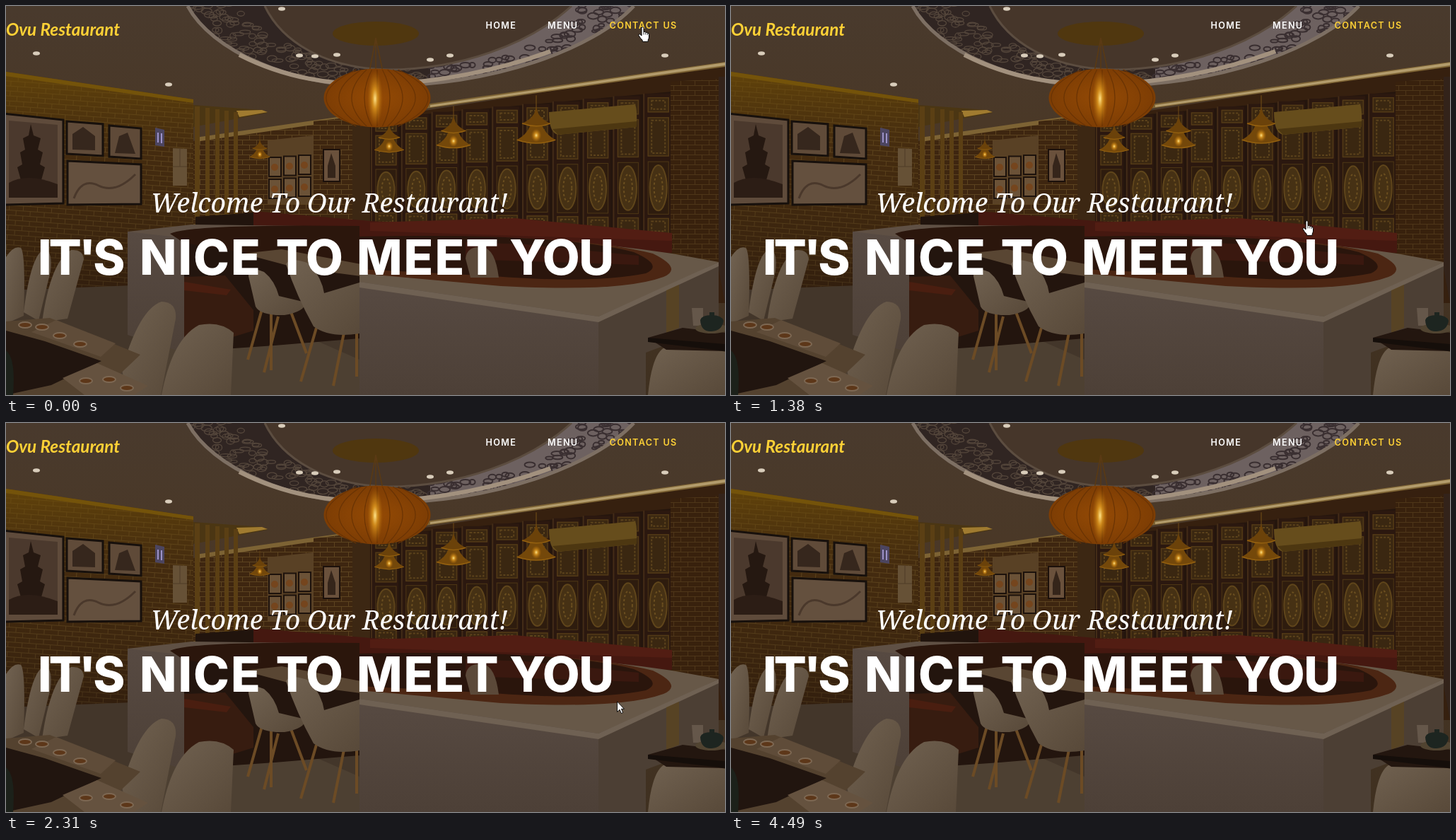
These frames come from a looping animation (1017 px wide and 550 px high, 8 s). An HTML page:

```html
<!DOCTYPE html>
<html lang="en">
<head>
<meta charset="utf-8">
<title>Restaurant</title>
<style>
html, body { margin: 0; width: 100%; height: 100%; overflow: hidden; background: #3b2c20; }
svg { display: block; width: 1017px; height: 550px; }
.brand { font: italic 700 24.3px Lato, sans-serif; fill: #fed136; }
.nav { font: 600 12.6px Inter, sans-serif; letter-spacing: 1.35px; fill: #fff; }
.nav .on { fill: #fed136; }
.lead { font: italic 400 37.5px "Noto Serif", serif; fill: #fff; }
.title { font: 800 68.5px Inter, sans-serif; letter-spacing: -1.5px; fill: #fff; }
.title .tight { letter-spacing: -4px; }
.title .wide { letter-spacing: 2px; }
</style>
</head>
<body>
<svg viewBox="0 0 1017 550" xmlns="http://www.w3.org/2000/svg">
<defs>
  <linearGradient id="ceil" x2="0" y2="1"><stop stop-color="#493a2d"/><stop offset=".3" stop-color="#4a3827"/><stop offset="1" stop-color="#3f3020"/></linearGradient>
  <linearGradient id="wallGlow" x2="0" y2="1"><stop stop-color="#6e4d08" stop-opacity=".75"/><stop offset=".35" stop-color="#5a3e0c" stop-opacity=".2"/><stop offset="1" stop-color="#1c100a" stop-opacity=".4"/></linearGradient>
  <linearGradient id="face" x2="0" y2="1"><stop stop-color="#574a42"/><stop offset="1" stop-color="#4d4037"/></linearGradient>
  <linearGradient id="seat" x2="1" y2="1"><stop stop-color="#716251"/><stop offset="1" stop-color="#584939"/></linearGradient>
  <radialGradient id="lamp"><stop stop-color="#944a05"/><stop offset="1" stop-color="#7d3d04"/></radialGradient>
  <radialGradient id="glow"><stop stop-color="#ffe48a"/><stop offset=".35" stop-color="#e09a20" stop-opacity=".8"/><stop offset="1" stop-color="#b06a0a" stop-opacity="0"/></radialGradient>
  <pattern id="brick" width="20" height="14" patternUnits="userSpaceOnUse">
    <rect width="20" height="14" fill="#3e2610"/>
    <path d="M0 .5H20M0 7.5H20M4.500 0V7M14.500 7V14" stroke="#5c4320"/>
  </pattern>
  <pattern id="brickL" href="#brick" patternTransform="rotate(4)"/>
  <clipPath id="ring"><path d="M257 0C290 62 400 114 530 113C690 112 830 62 888 0H800C740 55 640 90 540 90C450 88 390 50 366 0Z"/></clipPath>
</defs>

<!-- ceiling -->
<rect width="1017" height="550" fill="url(#ceil)"/>
<path d="M257 0C290 62 400 114 530 113C690 112 830 62 888 0Z" fill="#46362a"/>
<g clip-path="url(#ring)">
  <path d="M250 0H600V120H250Z" fill="#302522"/><path d="M600 0H900V120H600Z" fill="#6d6160"/>
  <g id="rings" fill="none"></g>
</g>
<g fill="none">
  <path d="M257 0C290 62 400 114 530 113C690 112 830 62 888 0" stroke="#7d6f63" stroke-width="5"/>
  <path d="M366 0C390 50 450 88 540 90C640 90 740 55 800 0" stroke="#5c4d40" stroke-width="3"/>
  <path d="M330 69C395 102 460 112 530 110C610 109 700 90 770 64" stroke="#a2917e" stroke-width="6"/>
</g>
<ellipse cx="523" cy="39" rx="61" ry="17" fill="#50370f"/>
<g id="spots" fill="#d9cdbb"></g>

<!-- back wall -->
<path d="M265 191L515 160L1017 82V420H265Z" fill="#36200f"/>
<path d="M265 191L515 153V320H265Z" fill="url(#brick)"/>
<path d="M268 186L600 138L1017 79V86L600 144L268 192Z" fill="#7d6334"/>
<path d="M600 140L1017 80V84L600 143Z" fill="#b39c6c"/>
<path d="M265 140L362 147L370 151L265 171Z" fill="#4b3613"/>
<path d="M326 148L362 147L370 150L330 157Z" fill="#a07b30"/>
<path d="M515 160L942 121V332L515 312Z" fill="#24150d"/>
<g id="panels"></g>
<path d="M940 107L1012 103V372L940 350Z" fill="url(#brick)"/>
<path d="M940 107L1012 103V372L940 350Z" fill="#241307" opacity=".25"/>
<path d="M1008 100H1017V420L1008 372Z" fill="#33231a"/>
<path d="M435 163L490 157V310H435Z" fill="url(#brick)"/>
<path d="M490 157L515 165V312H490Z" fill="#3c2713"/>
<path d="M370 190L435 183V280H370Z" fill="#594125"/>
<g id="posters"></g>
<rect x="449" y="203" width="23" height="45" fill="#6a513c" stroke="#1c110b" stroke-width="2"/>
<path d="M460 208L466 226V243H455V226Z" fill="#35251a"/>
<path d="M267 142h7v158h-7zM282 144h6v156h-6zM296 146h6v154h-6zM309 148h6v152h-6zM322 150h6v150h-6z" fill="#5b3f14"/>
<path d="M768 150L889 139Q893 140 892 171L781 182Q768 180 768 150Z" fill="#664d1c"/>
<path d="M773 174L892 163V171L781 182Z" fill="#4d3711"/>

<!-- left wall -->
<path d="M0 93L265 132V330L180 345V400L0 410Z" fill="url(#brickL)"/>
<path d="M0 93L265 132V330L180 345V400L0 410Z" fill="url(#wallGlow)"/>
<path d="M0 93L265 132V137L0 99Z" fill="#74530a"/>
<g stroke="#17100c" stroke-width="3">
  <path d="M-4 152L81 161V279L-4 281Z" fill="#5f4b3b"/>
  <path d="M86 163L137 167V212L86 209Z" fill="#604b39"/>
  <path d="M146 169L191 173V216L146 213Z" fill="#5f4a38"/>
  <path d="M87 219L191 224V280L87 281Z" fill="#64503e"/>
</g>
<path d="M4 162L73 168V270H4Z" fill="#4b392d"/>
<path d="M35 167L39 183L49 187L45 203L52 207L48 224L55 228L50 246H54V270H17V246H21L16 228L23 224L20 207L27 203L24 187L32 183Z" fill="#251811"/>
<path d="M4 250Q30 235 73 252V271H4Z" fill="#2c1d15"/>
<path d="M94 203V181L109 171L126 184V204ZM154 208L160 184L172 179L183 209Z" fill="#36271d"/>
<path d="M96 272Q107 242 131 254T183 238" fill="none" stroke="#4a382b" stroke-width="3"/>
<path d="M211 172L224 175V199L211 197Z" fill="#4c4560"/>
<path d="M215 179v14M220 180v14" stroke="#9d92c8" stroke-width="2"/>
<path d="M236 201L256 202V254H236Z" fill="#665136"/>
<path d="M236 227h20M246 202v25" stroke="#4e3c27"/>

<!-- lamps -->
<g id="lamps"></g>
<path d="M523 45V90M523 45L514 93M523 45L533 93" fill="none" stroke="#5a3a14" stroke-width="1.500"/>
<ellipse cx="525" cy="130" rx="75.500" ry="41.500" fill="url(#lamp)"/>
<g id="ribs" fill="none" stroke="#693304" stroke-width="1.200"></g>
<ellipse cx="522" cy="131" rx="11" ry="40" fill="url(#glow)"/>

<!-- floor and sofas -->
<path d="M0 402L180 395L252 440L500 445V550H0Z" fill="#43362a"/>
<path d="M180 490L340 430L500 500V550H120Z" fill="#4d4032"/>
<path d="M268 298L350 292V312L268 310Z" fill="#21140d"/>
<path d="M350 290L515 304L942 325V349L500 331L350 312Z" fill="#451810"/>
<path d="M515 306L720 300L942 321V332L515 318Z" fill="#521d13"/>
<path d="M172 319L262 309L500 312V340H235Z" fill="#5f5044"/>
<path d="M172 319L252 328V490L172 465Z" fill="url(#face)"/>
<path d="M232 322Q260 308 500 311V380L252 381V335Z" fill="#2b160c"/>
<path d="M252 335L345 350L500 369V470L380 480L252 489Z" fill="#23150e"/>
<path d="M252 383L310 381L350 430V459L252 489Z" fill="#371c10"/>
<path d="M252 390L318 401L312 409L252 402Z" fill="#4a1e10"/>
<path d="M335 350L390 344L502 365V382L410 370Z" fill="#594633"/>

<!-- main counter -->
<path d="M500 333Q700 314 942 350L1008 362L838 443L500 394Z" fill="#675848"/>
<path d="M500 331Q790 318 915 350Q958 371 930 383Q870 405 700 396L500 378Z" fill="#4c2613"/>
<path d="M500 326Q780 320 888 348Q931 367 905 378Q830 393 690 382L500 372Z" fill="#2a150c"/>
<path d="M650 334L735 337L895 353V366L650 358Z" fill="#3a180f"/>
<path d="M650 357q2-18 24-16q18 2 23 43h-40z" fill="#5b4939"/>
<path d="M500 390L838 439V550H500Z" fill="url(#face)"/>
<path d="M838 439L1008 364V452L905 490V550H838Z" fill="#4c3f34"/>
<path d="M500 390L838 439L1008 362V368L838 447L500 398Z" fill="#6f6153"/>
<path d="M934 402L952 394V455L934 462Z" fill="#604719" opacity=".6"/>

<!-- chairs and tables -->
<g fill="none" stroke="#6c4b25" stroke-width="4">
  <path d="M362 429L342 500M375 435V515M402 430L425 491M385 439L365 518"/>
  <path d="M439 455L417 531M478 462L463 537M496 455V524"/>
</g>
<g fill="url(#seat)">
  <path d="M343 382Q342 366 365 376Q380 388 386 410L424 419Q423 432 394 437Q360 438 353 425Z"/>
  <path d="M396 365Q401 354 429 364Q447 385 450 406L500 391V463Q458 470 435 453Q411 410 396 365Z"/>
  <path d="M0 355Q11 338 21 342Q28 350 25 438L0 449Z"/>
  <path d="M25 433Q36 346 56 344Q66 348 63 375L46 445Z"/>
  <path d="M51 447Q63 361 92 345Q109 344 110 358L87 442Z"/>
  <path d="M164 514Q188 429 220 418Q242 419 240 442L219 550H171Z"/>
  <path d="M220 550Q235 471 273 451Q303 445 322 462L318 550Z"/>
  <path d="M908 550Q914 488 934 482Q981 478 1017 489V550Z"/>
</g>
<path d="M0 446L62 441L190 493L130 550H0Z" fill="#54422f"/>
<path d="M0 459L55 474L135 502L64 536L0 550Z" fill="#21150f"/>
<path d="M71 444L155 477L134 496L36 461Z" fill="#5f4c39"/>
<path d="M80 526L129 505L201 537L181 550H111Z" fill="#65523f"/>
<g id="plates" stroke="#7d6853" stroke-width="2" fill="#5d3719"></g>
<path d="M0 487Q14 497 10 550H0Z" fill="#1c211a"/>
<path d="M908 469L957 455L1017 462V488L934 486Z" fill="#23160f"/>
<path d="M908 469L1017 478V488L908 475Z" fill="#150e0a"/>
<path d="M970 427h16v25h-14z" fill="#65574a"/>
<ellipse cx="998" cy="456" rx="23" ry="7" fill="#514431"/>
<path d="M982 444Q984 437 998 437T1015 445Q1013 459 998 460T982 444ZM995 433h7v5h-7Z" fill="#1d2520"/>

<!-- text -->
<text class="brand" x="0" y="42">Ovu Restaurant</text>
<g class="nav"><text x="678.500" y="32">HOME</text><text x="766" y="32">MENU</text><text class="on" x="853.500" y="32">CONTACT US</text></g>
<text class="lead" x="204.500" y="292">Welcome To Our Restaurant!</text>
<g class="title"><text class="tight" x="45" y="380">IT'S</text><text class="wide" x="189" y="380">NICE</text><text x="381.500" y="380">TO</text><text class="wide" x="496" y="380">MEET</text><text x="712" y="380">YOU</text></g>

<!-- pointers -->
<g id="hand">
  <path d="M5 13V2.200Q5 .6 6.500 .6T8 2.200V7.500Q10.500 6.600 10.800 8.400Q13 7.600 13.300 9.300Q15.500 8.800 15.500 11.500V15Q15.500 17 14.200 19V21.400H6.200V19.500Q3.500 17 .8 12.400Q.8 10.400 2.600 10.800Z" fill="#fff" stroke="#000"/>
  <path d="M8 7.500V11.500M10.800 8.500V11.500M13.300 9.500V12" stroke="#000" stroke-width=".8"/>
</g>
<path id="arrow" d="M.5 .8V15.500L4 12.300L6.300 17.500L8.600 16.500L6.400 11.300H10.400Z" fill="#fff" stroke="#000" stroke-width=".9"/>
</svg>
<script>
const $ = id => document.getElementById(id);
let seed = 7;
const rnd = () => (seed = seed * 16807 % 2147483647) / 2147483647;
const fill = (id, n, part) => { $(id).innerHTML = Array.from({ length: n }, (_, i) => part(i)).join(''); };

// mosaic discs along the ceiling ring
fill('rings', 260, i => {
  const a = Math.PI * (i / 260), k = .8 + .3 * rnd();
  const x = 574 - 300 * k * Math.cos(a), y = 108 * k * Math.sin(a) - 4;
  const right = x > 600;
  return `<ellipse cx="${x}" cy="${y}" rx="${4 + 4 * rnd()}" ry="${2 + 2.5 * rnd()}" stroke="${right ? '#3a2f31' : '#54463b'}" stroke-width="${right ? 2 : 1.3}"/>`;
});

const spots = [[390, 4], [415, 70], [437, 71], [468, 69], [600, 76], [628, 70], [43, 67], [230, 111], [932, 70]];
fill('spots', spots.length, i => `<ellipse cx="${spots[i][0]}" cy="${spots[i][1]}" rx="5" ry="2.800"/>`);

// carved door panels
fill('panels', 10, i => {
  const x = 516 + i * 42.8, t = 157 - i * 3.7, h = 154 + i * 5.2, y = f => t + h * f;
  const box = (a, b) => `<rect x="${x + 7}" y="${y(a)}" width="29" height="${h * (b - a)}" fill="#3a2711" stroke="#533a17" stroke-width="1.500"/>
    <rect x="${x + 12}" y="${y(a) + 4}" width="19" height="${h * (b - a) - 8}" fill="none" stroke="#5c431c" stroke-width="2" stroke-dasharray="3 2"/>`;
  return `<rect x="${x}" y="${t}" width="39" height="${h}" fill="#2b180f"/><path d="M${x + 1} ${t}V${t + h}" stroke="#432c17" stroke-width="2"/>`
    + box(.03, .13) + box(.17, .44) + box(.88, .99)
    + `<rect x="${x + 7}" y="${y(.48)}" width="29" height="${h * .37}" fill="#2e1c0e" stroke="#4e3716"/>
    <ellipse cx="${x + 21.5}" cy="${y(.665)}" rx="12" ry="${h * .16}" fill="#463114" stroke="#5f451b" stroke-width="2"/>
    <ellipse cx="${x + 21.5}" cy="${y(.665)}" rx="6" ry="${h * .1}" fill="none" stroke="#6b4f20" stroke-width="2" stroke-dasharray="3 3"/>`;
});

fill('posters', 6, i => {
  const x = 372 + i % 3 * 21, y = 214 + (i > 2) * 31 - i % 3 * 1.5;
  return `<rect x="${x}" y="${y}" width="17" height="27" fill="#6b5237" stroke="#1d120c" stroke-width="2"/><circle cx="${x + 8}" cy="${y + 14}" r="5" fill="#75451d"/>`;
});

// x, tip, scale of each pendant
const lamps = [[359, 189, .55], [542, 168, .8], [633, 156, .92], [750, 143, 1.05]];
fill('lamps', lamps.length, i => {
  const [x, y, s] = lamps[i];
  return `<g transform="translate(${x} ${y}) scale(${s})"><path d="M0 -16V3" stroke="#745018"/>
    <path d="M0 0L3 9Q8 17 19 22Q0 29 -19 22Q-8 17 -3 9Z" fill="#6b420a"/>
    <path d="M-8 25H8Q13 37 26 44Q0 53 -26 44Q-13 37 -8 25Z" fill="#74480a"/>
    <path d="M-19 22Q0 29 19 22M-26 44Q0 53 26 44" fill="none" stroke="#94600f" stroke-width="1.500"/>
    <ellipse cy="38" rx="7" ry="9" fill="url(#glow)"/></g>`;
});

fill('ribs', 9, i => {
  const d = (i - 4) * 18.5;
  return `<path d="M${525 + d * .4} 90Q${525 + d * 1.55} 130 ${525 + d * .4} 170"/>`;
});

fill('plates', 7, i => `<ellipse cx="${[27, 51, 76, 105, 113, 146, 171][i]}" cy="${[451, 454, 466, 478, 530, 528, 540][i]}" rx="9" ry="4"/>`);

const steps = [
  [0, 894, 29], [530, 852, 166], [680, 823, 274], [830, 814, 292], [950, 815, 300],
  [1100, 801, 274], [1380, 808, 303], [1530, 834, 396], [1650, 855, 472], [1800, 868, 490],
  [1920, 871, 462], [2040, 870, 424, 1], [2190, 866, 403, 1], [2310, 864, 393, 1],
  [3590, 863, 400, 1], [3710, 863, 426, 1], [3860, 871, 452, 1], [4010, 876, 477, 1],
  [4130, 884, 500, 1], [4250, 892, 520, 1], [4370, 900, 538, 1], [4490, 905, 560, 1]
];
const tools = [$('hand'), $('arrow')];

function draw(t) {
  const [, x, y, kind = 0] = steps.findLast(s => s[0] <= t);
  tools.forEach((el, i) => {
    el.setAttribute('visibility', i === kind ? 'visible' : 'hidden');
    el.setAttribute('transform', `translate(${x} ${y})`);
  });
}

const start = performance.now();
function loop() {
  draw((performance.now() - start) % 8000);
  requestAnimationFrame(loop);
}
draw(0);
requestAnimationFrame(loop);
</script>
</body>
</html>
```
